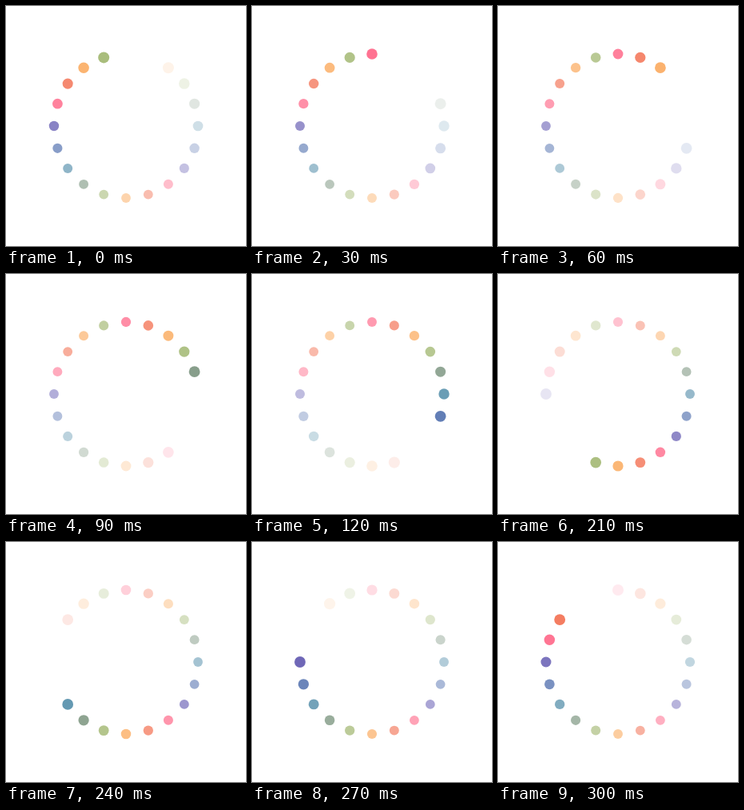
Animation, 300 px wide and 300 px high, one loop 330 ms. Source, as an HTML page with a canvas:

```html
<!DOCTYPE html>
<html>
<head>
<meta charset="utf-8">
<style>
  html, body { margin: 0; width: 100%; height: 100%; overflow: hidden; background: #fff; }
  canvas { display: block; }
</style>
</head>
<body>
<canvas id="stage" width="300" height="300"></canvas>
<script>
const ctx = document.getElementById('stage').getContext('2d');
const COLORS = ['#ff6c8c', '#f47c60', '#fbb069', '#a9bd7c', '#849c88', '#6096b0', '#607cb5', '#6c64b6'];
const DOTS = 20, STEPS = 11, STEP_MS = 30, RING = 90;
const VISIBLE_AGE = 17.45;

function drawDot(index, age) {
  const angle = index / DOTS * 2 * Math.PI;
  // Dots are widest when they appear and just before they vanish.
  const radius = 5.9 + 1.1 * (age / 8.5 - 1) ** 2;
  ctx.globalAlpha = 1 - age / DOTS;
  ctx.fillStyle = COLORS[index % COLORS.length];
  ctx.beginPath();
  ctx.arc(150 + RING * Math.sin(angle), 150 - RING * Math.cos(angle), radius, 0, 2 * Math.PI);
  ctx.fill();
}

function draw() {
  const step = Math.floor(performance.now() / STEP_MS) % STEPS;
  const head = DOTS - 1 + step * DOTS / STEPS;
  ctx.clearRect(0, 0, 300, 300);
  for (let i = 0; i < DOTS; i++) {
    const age = (head - i + DOTS) % DOTS;
    if (age < VISIBLE_AGE) drawDot(i, age);
  }
  requestAnimationFrame(draw);
}
draw();
</script>
</body>
</html>
```
